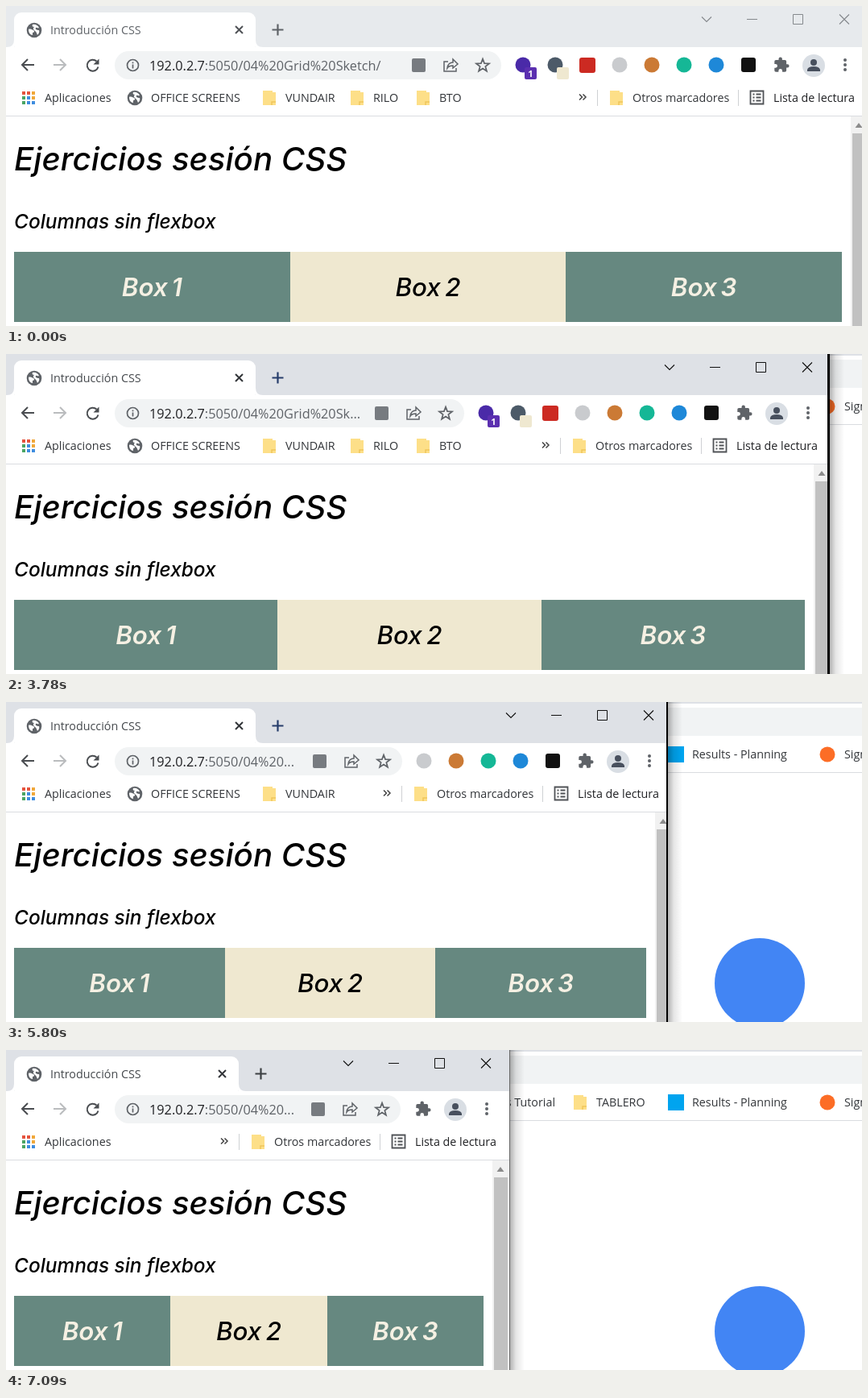
An HTML page with a canvas for the animation above (8000 ms loop, 1063 px wide and 397 px high).

```html
<!DOCTYPE html>
<html lang="es">
<head>
<meta charset="utf-8">
<title>Ventana</title>
<style>
html, body { margin: 0; width: 100%; height: 100%; overflow: hidden; background: #fff }
canvas { display: block }
</style>
</head>
<body>
<canvas id="stage" width="1063" height="397"></canvas>
<script>
const ctx = document.getElementById('stage').getContext('2d');
const LOOP = 8000, H = 397, STEP = 72;
const GREY = '#5f6368', INK = '#33363a';
const UI = '"Open Sans", sans-serif', PAGE = 'Inter, sans-serif';

// time, layout width, right edge of the window, width of the dark seam
const drag = [
  [0, 1068, 1069, 1], [3150, 1068, 1069, 1], [3160, 1060, 1061, 2],
  [3250, 1048, 1049, 1], [3490, 1048, 1049, 1], [3500, 1044, 1045, 3],
  [3780, 1022, 1023, 3], [4250, 958, 960, 2], [4320, 945, 946, 1],
  [4380, 931, 932, 1], [4660, 908, 909, 1], [5300, 908, 909, 1],
  [5310, 895, 889, 1], [6060, 778, 777, 3], [6140, 765, 764, 4],
  [6400, 703, 702, 4], [6940, 640, 641, 2], [7010, 630, 632, 1],
  [7090, 623, 626, 1], [LOOP, 623, 626, 1]
];

// label, icon centre, label end
const bookmarks = [
  ['OFFICE SCREENS', 160, 297], ['VUNDAIR', 327, 405],
  ['RILO', 436, 486], ['BTO', 518, 565]
];

function windowAt(t) {
  const i = drag.findLastIndex(k => k[0] <= t);
  const a = drag[i], b = drag[Math.min(i + 1, drag.length - 1)];
  const span = b[0] - a[0] || 1, n = Math.max(1, Math.round(span / STEP));
  const u = Math.floor((t - a[0]) / span * n) / n;
  return [1, 2, 3].map(j => Math.round(a[j] + (b[j] - a[j]) * u));
}

function rect(x, y, w, h, color, r = 0) {
  ctx.fillStyle = color;
  ctx.beginPath();
  ctx.roundRect(x, y, w, h, r);
  ctx.fill();
}

function circle(x, y, r, color) {
  rect(x - r, y - r, 2 * r, 2 * r, color, r);
}

function text(s, x, y, size, color, font = UI, style = '', align = 'left') {
  ctx.font = `${style} ${size}px ${font}`;
  ctx.fillStyle = color;
  ctx.textAlign = align;
  ctx.fillText(s, x, y);
}

function shape(d, x, y, color, width = 0, scale = 1) {
  ctx.save();
  ctx.translate(x, y);
  ctx.scale(scale, scale);
  ctx.fillStyle = ctx.strokeStyle = color;
  ctx.lineWidth = width;
  const path = new Path2D(d);
  width ? ctx.stroke(path) : ctx.fill(path);
  ctx.restore();
}

function globe(x, y) {
  circle(x, y, 9.3, GREY);
  shape('M-7-1C-6-2-3-1-1 0C1 1 0 3-2 3V6C-5 6-7 3-7-1M-2-7C1-8 5-6 6-3C4-2 3-4 2-3C1-1 3 0 6 0C7 3 5 5 4 6C3 4 3 2 1 1C-1-1-2-2 0-4C-2-4-3-5-2-7', x, y, '#fff');
}

function folder(x, y) {
  shape('M-8-9H4V-7H8V9H-8z', x, y, '#fddf88');
  shape('M3 9V5H8', x, y, '#efc65b', 1.5);
}

function label(s, x, y, color = INK) {
  text(s, x, y, 14.3, color);
}

function drawBackdrop() {
  rect(0, 0, 1063, H, '#fff');
  rect(0, 0, 1063, 2, '#dee1e6');
  rect(0, 7, 1063, 35, '#f1f3f4');
  rect(0, 87, 1063, 1, '#dadce0');
  text('Notes Tutorial', 682, 70, 14.3, INK, UI, '', 'right');
  folder(713, 65);
  label('TABLERO', 733, 70);
  rect(822, 55, 20, 20, '#00a4ef');
  label('Results - Planning', 852, 70);
  circle(1020, 65, 9.5, '#fc6d26');
  label('Sign in', 1041, 70);
  circle(936, 349, 56, '#4285f4');
}

function drawShadow(edge) {
  const fade = ctx.createLinearGradient(edge, 0, edge + 18, 0);
  fade.addColorStop(0, 'rgba(0,0,0,.3)');
  fade.addColorStop(.4, 'rgba(0,0,0,.1)');
  fade.addColorStop(1, 'rgba(0,0,0,0)');
  rect(edge, 0, 18, H, fade);
}

function drawTabs(W, active) {
  const tabEnd = Math.min(310, W - 334);
  rect(0, 0, 1080, 51, active ? '#dee1e6' : '#e7eaed');
  rect(10, 8, tabEnd - 10, 50, '#fff', 9);
  shape('M0 0Q9 0 9-9V0z', 1, 51, '#fff');
  shape('M0 0Q-9 0-9-9V0z', tabEnd + 9, 51, '#fff');
  globe(35, 30);
  label('Introducción CSS', 55, 35, active ? '#45494d' : GREY);
  shape('M-4.5-4.5 4.5 4.5M4.5-4.5-4.5 4.5', tabEnd - 20.5, 29.5, active ? INK : '#505357', 2);
  const plus = !active ? GREY : W < 644 ? '#3c4043' : '#263d6b';
  shape('M-7 0H7M0-7V7', tabEnd + 27.5, 29.5, plus, 2.2);

  const c = active ? '#111' : '#85898d';
  shape('M-6-3 0 3 6-3', W - 198, 16.5, c, 1.1);
  shape('M-6 0H7', W - 142, 16.5, c, 1);
  shape('M-6-6H6V6H-6z', W - 84.5, 16.5, c, 1);
  shape('M-6-6 6 6M6-6-6 6', W - 27, 16.5, c, 1.1);
}

function drawAddress(right) {
  rect(135, 56, right - 135, 35, '#f1f3f4', 17.5);
  shape('M7 0A7 7 0 1 1-7 0A7 7 0 1 1 7 0M0-1V4M0-4V-2.3', 157.5, 73.5, GREY, 1.7);
  const host = '192.0.2.7';
  let rest = ':5050/04%20Grid%20Sketch/';
  ctx.font = `16.3px ${UI}`;
  const room = right - 126 - 178, width = s => ctx.measureText(s).width;
  if (width(host + rest) > room) {
    while (width(host + rest + '...') > room) rest = rest.slice(0, -1);
    rest += '...';
  }
  text(host, 178, 80, 16.3, '#202124');
  text(rest, 178 + width(host), 80, 16.3, GREY);

  rect(right - 111, 65, 17, 17, '#777b80', 2);
  shape('M-3-5H-8V7H7V3M-4 3Q-3-4 3-4V-8L9-2 3 3V0Q-2 0-4 3z', right - 63, 74, GREY, 1.5);
  let star = '';
  for (let i = 0; i < 10; i++) {
    const r = i % 2 ? 3.5 : 8.4, a = i * Math.PI / 5;
    star += `${i ? 'L' : 'M'}${r * Math.sin(a)} ${-r * Math.cos(a)}`;
  }
  shape(star + 'z', right - 23, 74, GREY, 1.7);
}

function drawExtension(i, x) {
  const y = 73;
  if (i === 0) rect(x - 9, y - 9, 18, 18, '#111', 3);
  else if (i === 5) rect(x - 10, y - 9, 20, 19, '#cc2a22', 3);
  else circle(x, y, 9.5, [, '#1e88d8', '#15b796', '#cb7a35', '#c9cbce', , '#4c5a68', '#4a2aa8'][i]);
  if (i === 6) rect(x + 2, 76, 15, 15, '#efe8d0', 2);
  if (i === 7) {
    rect(x + 2, 76, 15, 15, '#5b2fb0', 2);
    text('1', x + 9.5, 88, 11, '#fff', UI, 'bold', 'center');
  }
}

function drawToolbar(W) {
  rect(0, 51, 1080, 85, '#fff');
  rect(0, 136, 1080, 1, '#dadce0');
  shape('M8 0H-7M0-7-7 0 0 7', 27, 73, '#4a4d51', 2);
  shape('M-8 0H7M0-7 7 0 0 7', 67, 73, '#babcbe', 2);
  shape('M5-5A7 7 0 1 0 7 2', 107.5, 73.5, '#4a4d51', 2);
  shape('M8-8V-1H1z', 107.5, 73.5, '#4a4d51');

  const count = Math.max(0, Math.min(8, Math.floor((W - 598) / 40)));
  drawAddress(W - 133 - 40 * count);
  for (let i = 0; i < count; i++) drawExtension(i, W - 146 - 40 * i);
  shape('M8.5-1H7V-5a2 2 0 0 0-2-2H1V-8.5a2.5 2.5 0 0 0-5 0V-7H-8a2 2 0 0 0-2 2v3.8h1.5a2.7 2.7 0 0 1 0 5.4H-10V8a2 2 0 0 0 2 2h3.8v-1.5a2.7 2.7 0 0 1 5.4 0V10H5a2 2 0 0 0 2-2v-4h1.5a2.5 2.5 0 0 0 0-5z', W - 105, 73, GREY, 0, .87);
  circle(W - 65, 74, 14, '#d9dee4');
  circle(W - 65, 70, 4, '#48505e');
  shape('M-8 6V4Q-7 0 0 0T8 4V6z', W - 65, 75, '#48505e');
  for (const y of [67, 73, 79]) circle(W - 26, y, 2, GREY);
}

function drawBookmarks(W) {
  const dots = ['#e5533d', '#e5533d', '#f0a83a', '#4aa564', '#3f8de0', '#f0a83a', '#4aa564', '#3f8de0', '#3f8de0'];
  dots.forEach((c, i) => rect(20 + i % 3 * 6, 106 + Math.floor(i / 3) * 6, 4, 4, c));
  label('Aplicaciones', 48, 119);
  bookmarks.forEach(([name, x, end], i) => {
    if (end + 10 >= W - 360) return;
    i ? folder(x, 114) : globe(x, 114);
    label(name, x + 20, 119);
  });
  shape('M-4-3.5-.5 0-4 3.5M.5-3.5 4 0 .5 3.5', W - 352, 113, '#444', 1.5);
  for (const x of [334, 159]) rect(W - x, 104, 1, 20, '#cfd1d4');
  folder(W - 310, 114);
  label('Otros marcadores', W - 290, 119);
  shape('M-8-8H8V8H-8zM-5-4H-3M-1-4H5M-5 0H-3M-1 0H5M-5 4H-3M-1 4H5', W - 135.5, 113.5, '#505357', 1.8);
  label('Lista de lectura', W - 115, 119, '#202124');
}

function drawPage(W, t) {
  text('Ejercicios sesión CSS', 10, 204, 40.2, '#000', PAGE, 'italic 500');
  text('Columnas sin flexbox', 10, 276, 24.4, '#000', PAGE, 'italic 500');
  const w = (W - 40) / 3;
  ctx.wordSpacing = '-3px';
  for (let i = 0; i < 3; i++) {
    const x = Math.round(10 + i * w), cream = i === 1;
    rect(x, 305, Math.round(10 + (i + 1) * w) - x, 87, cream ? '#efe8d0' : '#668880');
    text(`Box ${i + 1}`, 10 + (i + .5) * w, 360, 31.3, cream ? '#000' : '#f5f0e3',
      PAGE, cream ? 'italic 500' : 'italic 600', 'center');
  }
  ctx.wordSpacing = '0px';
  rect(W - 19, 137, 30, H, '#f1f1f1');
  rect(W - 17, 158, 17, H, t >= 450 && t < 520 ? '#a8a8a8' : '#c1c1c1');
  shape('M-4.5 3 0-3 4.5 3z', W - 9, 148, '#8b8b8b');
}

function draw(t) {
  const [W, edge, seam] = windowAt(t);
  drawBackdrop();
  drawShadow(edge);
  ctx.save();
  ctx.beginPath();
  ctx.rect(0, 0, edge - seam, H);
  ctx.clip();
  rect(0, 0, 1080, H, '#fff');
  drawTabs(W, t >= 1380);
  drawToolbar(W);
  drawBookmarks(W);
  drawPage(W, t);
  ctx.restore();
  rect(edge - seam, 0, seam, H, seam > 1 ? '#000' : '#666');
}

function frame() {
  draw(performance.now() % LOOP);
  requestAnimationFrame(frame);
}
frame();
</script>
</body>
</html>
```
